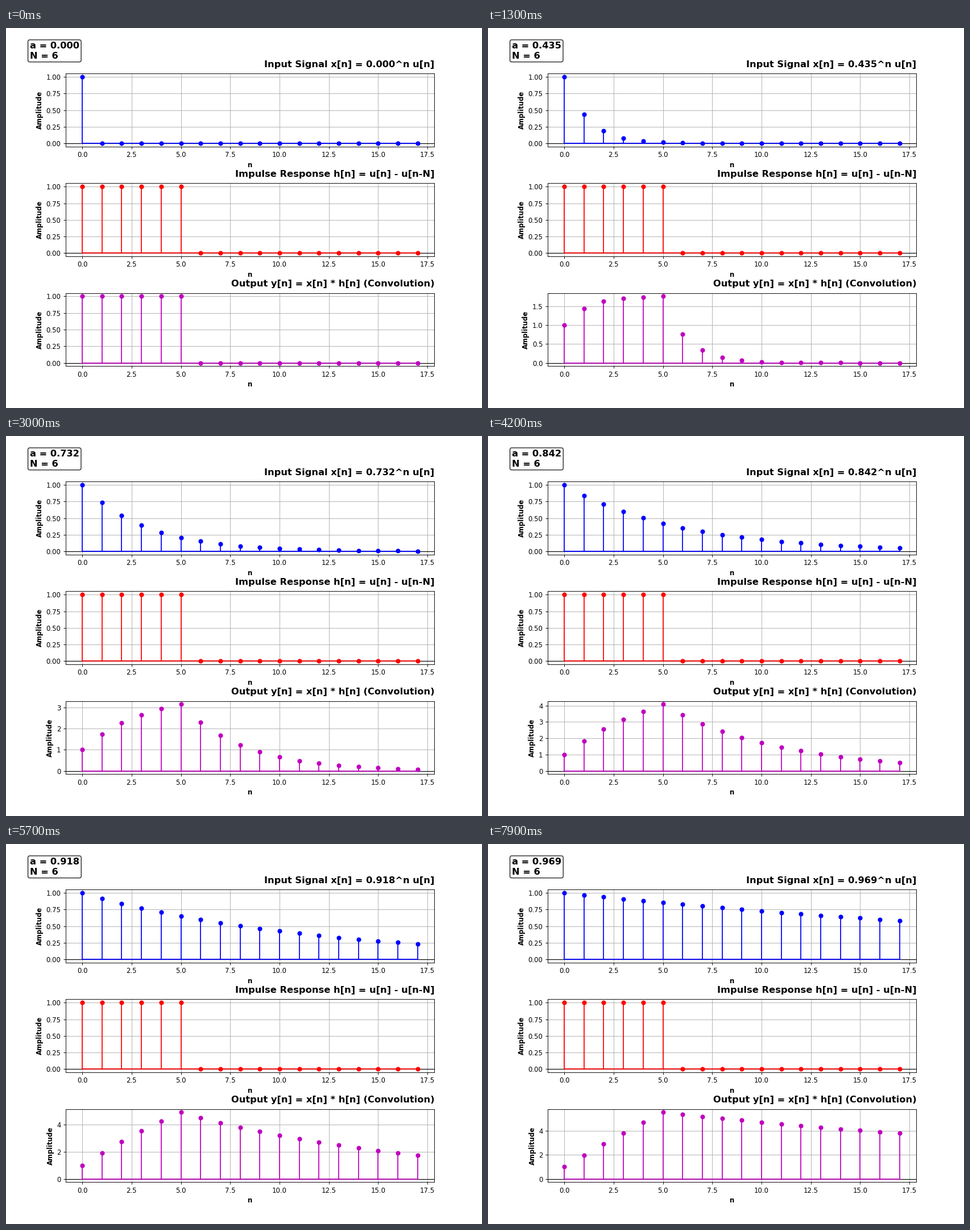
Animation, 837 px wide and 669 px high, one loop 8 s. Source, as a matplotlib script:

```python
import numpy as np
import matplotlib.pyplot as plt
from matplotlib.animation import FuncAnimation

WIDTH, HEIGHT, DPI = 837, 669, 83.7
FRAMES, INTERVAL = 80, 100
RATE = 0.0439          # how fast a approaches 1, per frame
N = 6
n = np.arange(18)
h = np.where(n < N, 1.0, 0.0)

plt.rcParams["font.family"] = "DejaVu Sans"
# the small margin keeps the pixel size from rounding down
fig, axes = plt.subplots(
    3, 1, figsize=((WIDTH + 0.01) / DPI, (HEIGHT + 0.01) / DPI), dpi=DPI)
fig.subplots_adjust(left=0.125, right=0.9, bottom=0.11, top=0.88, hspace=0.5)


def set_title(ax, text):
    ax.set_title(text, loc="right", fontsize=14, fontweight="bold", pad=10)


def make_stem(ax, color, title):
    ax.axhline(0, color="black", linewidth=1)
    stem = ax.stem(n, h, linefmt=color + "-", markerfmt=color + "o",
                   basefmt=color + "-")
    ax.set_xlabel("n", fontweight="bold")
    ax.set_ylabel("Amplitude", fontweight="bold")
    ax.grid(True)
    set_title(ax, title)
    return stem


def set_stem(ax, stem, values):
    stem.markerline.set_ydata(values)
    stem.stemlines.set_segments([[(i, 0), (i, v)] for i, v in zip(n, values)])
    pad = 0.05 * values.max()
    ax.set_ylim(-pad, values.max() + pad)


x_stem = make_stem(axes[0], "b", "")
h_stem = make_stem(axes[1], "r", "Impulse Response h[n] = u[n] - u[n-N]")
y_stem = make_stem(axes[2], "m", "Output y[n] = x[n] * h[n] (Convolution)")
info = fig.text(0.05, 0.92, "", fontsize=14, fontweight="bold",
                bbox=dict(boxstyle="round,pad=0.2", facecolor="white",
                          edgecolor="black"))


def update(frame):
    a = 1 - np.exp(-RATE * frame)
    x = a ** n
    y = np.convolve(x, h)[:len(n)]
    set_stem(axes[0], x_stem, x)
    set_stem(axes[2], y_stem, y)
    set_title(axes[0], f"Input Signal x[n] = {a:.3f}^n u[n]")
    info.set_text(f"a = {a:.3f}\nN = {N}")
    return []


anim = FuncAnimation(fig, update, frames=FRAMES, interval=INTERVAL,
                     repeat=True, repeat_delay=0, blit=False)
plt.show()
```
